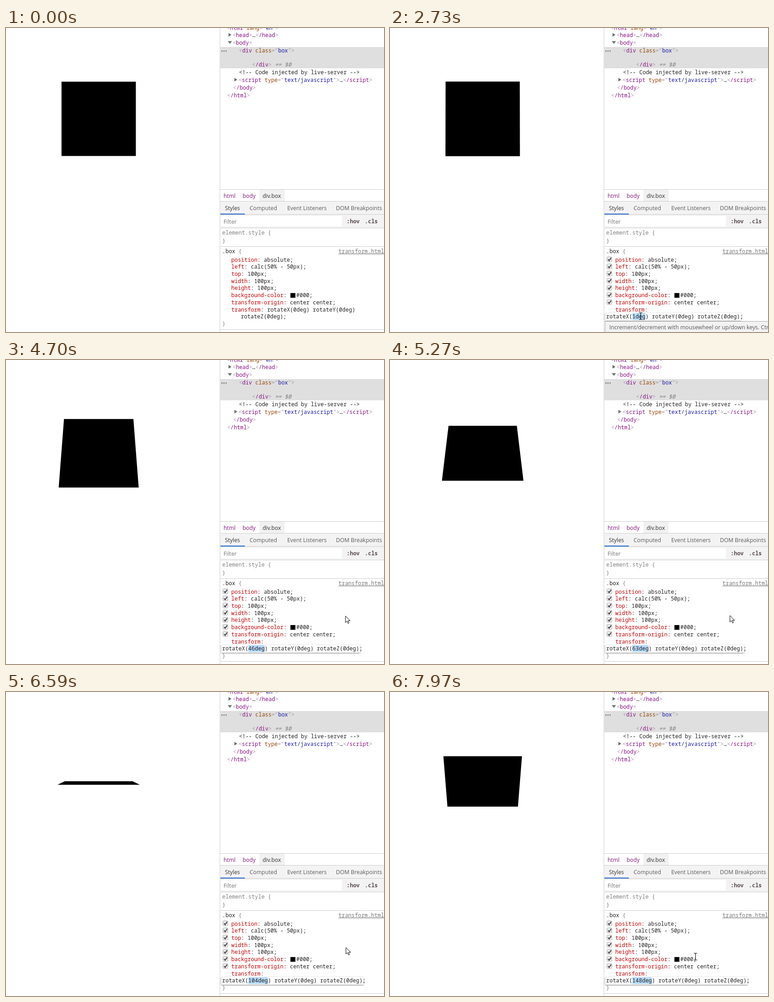
An HTML page that plays this animation: 834x671 px, repeating every 8 s.

```html
<!DOCTYPE html>
<html lang="en">
<head>
<meta charset="utf-8">
<title>Rotating box in the inspector</title>
<style>
  html, body { margin: 0; width: 100%; height: 100%; overflow: hidden; background: #fff; }
  svg { display: block; }
  text { white-space: pre; }
  .mono { font: 12px "Noto Sans Mono", "DejaVu Sans Mono", monospace; }
  .ui { font: 12.3px "Open Sans", "Noto Sans", sans-serif; }
</style>
</head>
<body>
<svg id="stage" width="834" height="671" viewBox="0 0 834 671">
  <defs>
    <filter id="shadow" x="-5%" y="-50%" width="110%" height="220%">
      <feDropShadow dx="0" dy="1" stdDeviation="1.5" flood-opacity=".5"/>
    </filter>
  </defs>
</svg>
<script>
const stage = document.getElementById('stage');
const LOOP = 8000, CHAR = 7.2;
const INK = '#222', TAG = '#881280', PUNCT = '#a894a6', ATTR = '#994500',
      VALUE = '#1a1aa6', PROP = '#c80000', GREY = '#808080', LINE = '#cccccc';

function add(name, attrs, parent = stage) {
  const el = document.createElementNS('http://www.w3.org/2000/svg', name);
  for (const key in attrs) el.setAttribute(key, attrs[key]);
  parent.appendChild(el);
  return el;
}
const group = (parent = stage) => add('g', {}, parent);
const rect = (x, y, width, height, fill, parent) => add('rect', { x, y, width, height, fill }, parent);
const path = (d, attrs, parent) => add('path', { d, ...attrs }, parent);

// Each part is [string, colour, extra attributes].
function text(x, y, parts, parent, cls = 'mono') {
  const el = add('text', { x, y, class: cls }, parent);
  for (const [str, fill, extra] of parts) add('tspan', { fill, ...extra }, el).textContent = str;
  return el;
}
const label = (x, y, str, fill, parent) => text(x, y, [[str, fill]], parent, 'ui');
const tag = name => [['<', PUNCT], [name, TAG], ['>', PUNCT]];
const openTag = (name, attr, value) => [
  ['<', PUNCT], [name + ' ', TAG], [attr, ATTR], ['="', PUNCT], [value, VALUE], ['">', PUNCT]];

// Page
const box = add('polygon', { fill: '#000' });

// Element tree
rect(471.5, 0, 1, 671, LINE);
rect(473, 42, 361, 47, '#dfdfdf');
text(487, 3.5, openTag('html', 'lang', 'en'));
text(500, 20, [...tag('head'), ['…', INK], ...tag('/head')]);
text(500, 37, tag('body'));
text(514, 54, openTag('div', 'class', 'box'));
text(543, 85, [...tag('/div'), [' == $0', '#777', { 'font-style': 'italic' }]]);
text(514, 102, [['<!-- Code injected by live-server -->', INK]]);
text(513, 119, [...openTag('script', 'type', 'text/javascript'), ['…', INK], ...tag('/script')]);
text(501, 135.5, tag('/body'));
text(488, 153, tag('/html'));
path('M491 11l6.500 4-6.500 4zM489.500 29h9l-4.500 6zM504 110l6.500 4-6.500 4z', { fill: '#6e6e6e' });
for (const x of [476.5, 481, 485.5]) add('circle', { cx: x, cy: 51, r: 1.4, fill: '#777' });

// Breadcrumbs, tabs and filter
rect(473, 356, 361, 1, LINE);
rect(559, 357, 56, 25, '#f1f1f1');
label(480, 375, 'html', TAG);
label(522, 375, 'body', TAG);
label(566, 375, 'div.box', '#303030');
rect(473, 382, 361, 59, '#f3f3f3');
rect(473, 382, 361, 1, LINE);
rect(473, 411, 361, 1, LINE);
rect(473, 409.5, 54, 2.5, '#3b79d0');
label(483, 402, 'Styles', '#333');
label(537.5, 402, 'Computed', '#5a5a5a');
label(620.5, 402, 'Event Listeners', '#5a5a5a');
label(728, 402, 'DOM Breakpoints', '#5a5a5a');
rect(474, 415, 267, 23, '#fff');
label(480, 432, 'Filter', '#757575');
const bold = { 'font-weight': 700 };
text(751.5, 431, [[':hov', '#5a4a55', bold]]);
text(791.5, 431, [['.cls', '#5a4a55', bold]]);
rect(473, 441, 361, 1, LINE);

// Style rules
text(477, 456, [['element.style {', GREY]]);
text(477, 474, [['}', GREY]]);
rect(473, 482, 361, 1, LINE);
text(477, 497, [['.box', INK], [' {', GREY]]);
text(733.5, 497, [['transform.html', '#777', { 'text-decoration': 'underline' }]]);
const rowY = i => 515.5 + i * 15.72;
[
  ['position', 'absolute'], ['left', 'calc(50% - 50px)'], ['top', '100px'], ['width', '100px'],
  ['height', '100px'], ['background-color', ''], ['transform-origin', 'center center'], ['transform', '']
].forEach(([name, value], i) =>
  text(497, rowY(i), [[name, PROP], [': ' + (value && value + ';'), INK]]));
rect(627.5, 585, 11, 10.5, '#000');
text(640.5, rowY(5), [['#000;', INK]]);
text(477, 657, [['}', GREY]]);
rect(473, 665, 361, 1, LINE);

const resting = group();
text(497 + 11 * CHAR, rowY(7), [['rotateX(0deg) rotateY(0deg)', INK]], resting);
text(518, rowY(8), [['rotateZ(0deg);', INK]], resting);

const checks = [...Array(8).keys()].map(i => {
  const g = group(), y = rowY(i) - 10.5;
  add('rect', { x: 478.5, y, width: 11, height: 11, rx: 2, fill: '#ececec', stroke: '#a9a9a9' }, g);
  path(`M481 ${y + 5.5}l2.500 3 4.500-6.500`, { fill: 'none', stroke: '#3c3c3c', 'stroke-width': 2 }, g);
  return g;
});

// Value editor
const editor = group();
const field = add('rect', { x: 475, y: 629, height: 17, fill: '#fff', filter: 'url(#shadow)' }, editor);
const selection = rect(477, 629.5, 0, 15, '#b5dafb', editor);
const valueText = text(477, rowY(8), [['', INK]], editor).firstChild;

const tooltip = group();
add('rect', { x: 474.5, y: 647.5, width: 380, height: 40, fill: '#f2f2f2', stroke: '#a8a8a8' }, tooltip);
label(484, 665, 'Increment/decrement with mousewheel or up/down keys. Ctrl', '#575757', tooltip);

// Pointers
const arrow = path('M0 0v14.500l3.400-3.200 2.300 5.200 2.200-1-2.300-5h4.700z',
  { fill: '#fff', stroke: '#000', 'stroke-width': 1 });
const beam = path('M-3.500-7.500h2.500l1 1 1-1h2.500M0-6.500v13M-3.500 7.500h2.500l1-1 1 1h2.500',
  { fill: 'none', stroke: '#000', 'stroke-width': 1.1 });

// Rows are [time, value, ...]; a repeated time makes a jump.
const DEGREES = [
  [0, 0], [2720, 0], [2720, 1], [3190, 1], [3190, 2], [3990, 24], [4700, 46], [4750, 46.5], [5640, 76],
  [5790, 80], [5840, 80.9], [6450, 101], [6590, 101], [6590, 104], [7370, 130], [7970, 148], [8000, 148.9]
];
const POINTER = [
  [0, 826, 26], [120, 826, 26], [550, 645, 623], [1070, 645, 623], [1150, 640, 634], [1380, 640, 634],
  [1720, 592, 655], [2070, 553, 636], [3250, 553, 636], [3900, 749, 565], [4750, 749, 565],
  [4800, 750, 564], [7000, 750, 564], [7370, 712, 575], [7970, 674, 584], [8000, 674, 584]
];

function sample(table, t) {
  let i = table.length - 2;
  while (i > 0 && table[i][0] > t) i--;
  const [a, b] = [table[i], table[i + 1]];
  const k = (t - a[0]) / (b[0] - a[0]);
  return a.slice(1).map((v, j) => v + (b[j + 1] - v) * k);
}

// Square of half side 82 turned about X, seen with perspective 820.
function project(degrees) {
  const half = 82, depth = 820, cx = 204.5, cy = 200.5, eyeY = -44;
  const a = degrees * Math.PI / 180;
  return [[-1, -1], [1, -1], [1, 1], [-1, 1]].map(([sx, sy]) => {
    const scale = depth / (depth - sy * half * Math.sin(a));
    const y = cy + sy * half * Math.cos(a);
    return [cx + sx * half * scale, eyeY + (y - eyeY) * scale].map(v => v.toFixed(2));
  }).join(' ');
}

const show = (el, on) => el.setAttribute('display', on ? 'inline' : 'none');

function draw(t) {
  const degrees = Math.floor(sample(DEGREES, t)[0] + 1e-6);
  const settled = t < 3190 || (t >= 6490 && t < 6620);
  box.setAttribute('points', project(settled ? degrees : degrees - 1));

  const editing = t >= 870;
  show(resting, !editing);
  show(editor, editing);
  checks.forEach((c, i) => show(c, t >= 430 && (i < 7 || !editing)));

  const angle = degrees + 'deg';
  const value = `rotateX(${angle}) rotateY(0deg) rotateZ(0deg)`;
  valueText.textContent = value + ';';
  field.setAttribute('width', value.length * CHAR + 4);
  const allSelected = t < 2000, angleSelected = t >= 2500;
  selection.setAttribute('x', 477 + (allSelected ? 0 : 8 * CHAR));
  selection.setAttribute('width', CHAR * (allSelected ? value.length : angleSelected ? angle.length : 0));

  show(tooltip, t >= 2725 && t < 3450);

  const [x, y] = sample(POINTER, t);
  const isArrow = t < 480 || (t >= 3400 && t < 7390);
  for (const el of [arrow, beam]) el.setAttribute('transform', `translate(${x.toFixed(1)} ${y.toFixed(1)})`);
  show(arrow, t >= 120 && isArrow);
  show(beam, t >= 120 && !isArrow);
}

const start = performance.now();
function tick() {
  draw((performance.now() - start) % LOOP);
  requestAnimationFrame(tick);
}
tick();
</script>
</body>
</html>
```
